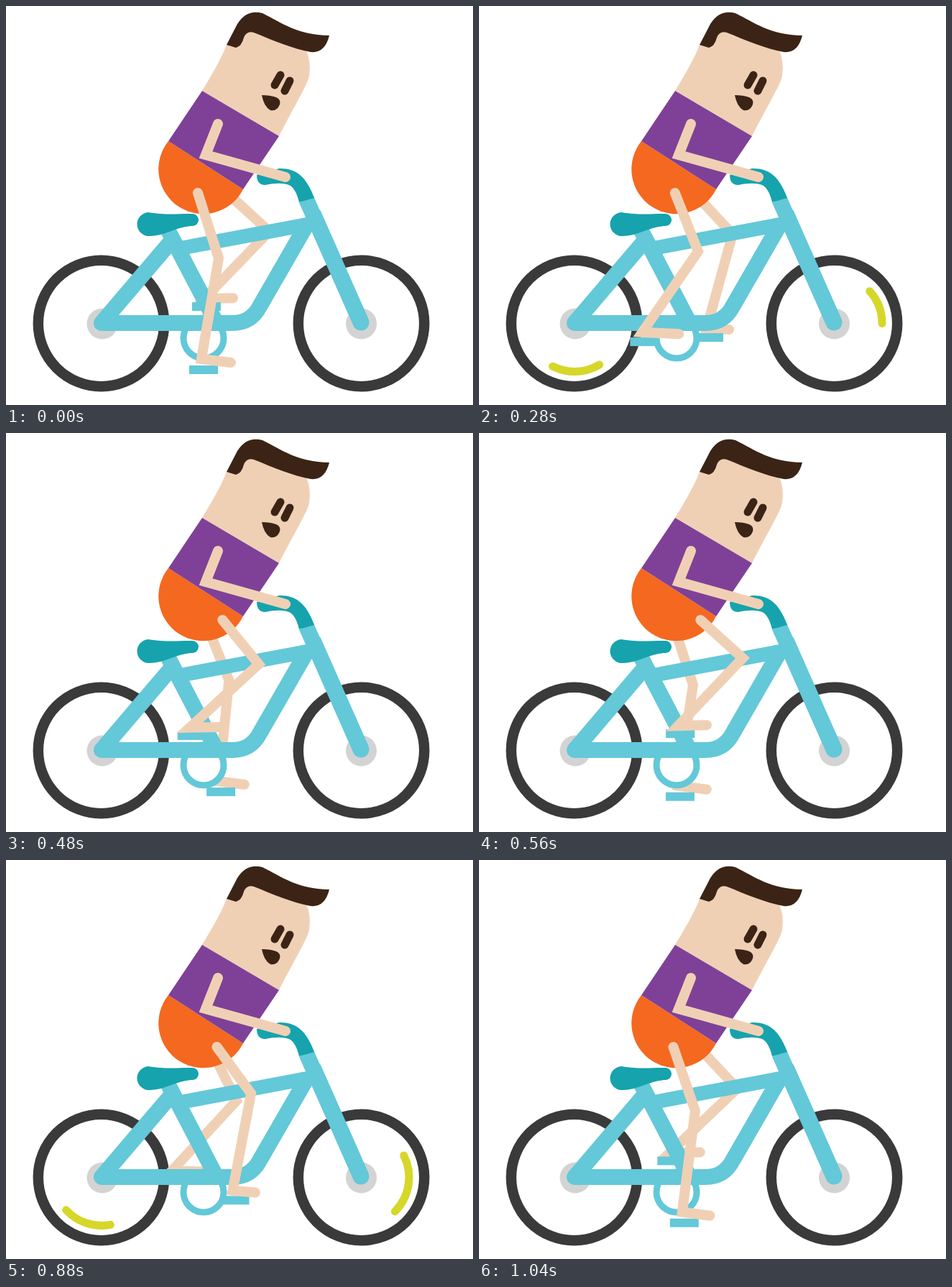
An HTML page that plays this animation: 650x555 px, repeating every 1.12 s.

```html
<!DOCTYPE html>
<html lang="en">
<head>
<meta charset="utf-8">
<title>Cyclist</title>
<style>
  html, body { margin: 0; width: 100%; height: 100%; overflow: hidden; background: #fff; }
  svg { display: block; width: 650px; height: 555px; }
  .line { fill: none; stroke-miterlimit: 10; }
  .tire { fill: none; stroke: #3a3a3a; stroke-width: 14.5; }
  .hub { fill: #d3d3d3; }
  .spark { stroke: #d6d729; stroke-width: 11; stroke-linecap: round; }
  .limb { stroke: #f0d0b5; stroke-width: 14; stroke-linecap: round; }
  .tube { stroke: #63c8d8; stroke-width: 22; stroke-linejoin: round; }
  .ring { fill: #fff; stroke: #63c8d8; stroke-width: 9; }
  .pedal { fill: #63c8d8; }
  .teal { fill: #16a3ad; }
  .skin { fill: #f0d0b5; }
  .dark { fill: #3b2416; }
  .eye { stroke: #3b2416; stroke-width: 11; stroke-linecap: round; }
</style>
</head>
<body>
<svg viewBox="0 0 650 555">
  <circle class="hub" cx="134" cy="442" r="21.5"/>
  <circle class="hub" cx="494.5" cy="442" r="21.5"/>
  <circle class="tire" cx="132.5" cy="441.5" r="87.7"/>
  <circle class="tire" cx="494.5" cy="441.5" r="87.7"/>
  <path id="rearSpark" class="line spark"/>
  <path id="frontSpark" class="line spark"/>

  <path id="farLeg" class="line limb"/>
  <rect id="farPedal" class="pedal" width="40" height="12"/>

  <!-- bicycle -->
  <circle class="ring" cx="275" cy="462" r="28"/>
  <g class="line tube">
    <path d="M231 326L133 441L315 441Q341 441 353 418L421 300"/>
    <path d="M224 309L292 439"/>
    <path d="M243 337L424 303" stroke-width="20"/>
    <path d="M418 269L494 440"/>
    <path d="M428 291L494 440" stroke-width="23" stroke-linecap="round"/>
  </g>
  <path class="teal" d="M198 287C225 291 235 289 259 289A8.500 8.500 0 0 1 260 306C240 306 220 320 200 320A16.500 16.500 0 0 1 198 287Z"/>
  <path class="teal" d="M349 235Q349 249 361 249C375 246 388 246 396 250Q404 256 408 273L429 267C420 243 408 225 380 226Z"/>

  <!-- rider -->
  <path fill="#f56820" d="M226 188A62.200 62.200 0 1 0 330 255Z"/>
  <path class="skin" d="M273 118C290 90 300 72 307 54L325 28L418 62Q425 77 422 97C420 108 411 122 380 181Z"/>
  <path fill="#7f4197" d="M273 118L380 181L330 255L226 188Z"/>
  <path class="dark" d="M307 54L322 25Q335 4 357 10C385 24 405 40 450 41Q444 66 424 64C400 60 370 47 345 37Q335 34 331 44Q328 56 320 58Z"/>
  <path class="line eye" d="M382 96L374 110M395 104L388 118"/>
  <path class="dark" d="M356 124Q368 124 376 127Q383 130 381 137Q377 147 368 145Q359 140 356 124Z"/>
  <path class="line limb" d="M295 164L278 207L389 238"/>

  <rect id="nearPedal" class="pedal" width="40" height="12"/>
  <path id="nearLeg" class="line limb"/>
</svg>
<script>
const LOOP = 1120, STEP = 40, FRAMES = 27;
const CYCLE = FRAMES * STEP; // the last pose rests for the remainder of the loop
const { sin, cos, min, PI } = Math;
const el = id => document.getElementById(id);
const rad = deg => deg * PI / 180;

// Every joint of a leg follows from the angle of its crank.
function drawLeg(name, deg) {
  const a = rad(deg), c = cos(a), s = sin(a);
  const hip = [287 + 12 * c - 20 * s, 260];
  const knee = [
    330 + 22 * c - 34 * s - 3 * sin(2 * a),
    331 - 11 * c + 18 * s - 2 * cos(2 * a) + 3 * sin(2 * a)
  ];
  const heel = [272 + 45 * c, 449 + 42 * s];
  const toe = [heel[0] + 41 - 10 * c, heel[1] + 2 + 3 * s];
  el(name + "Leg").setAttribute("d", "M" + [hip, knee, heel, toe].join(" "));
  el(name + "Pedal").setAttribute("x", 255 + 45 * c);
  el(name + "Pedal").setAttribute("y", 456 + 44 * s);
}

// An arc sweeps along the wheel, growing at first and closing up at the end.
function drawSpark(id, x, t, headStart, headSpeed, spanStart, spanSpeed) {
  const grow = min(1, (t - 200) / 80, (480 - t) / 80);
  const head = headStart + headSpeed * (t - 280);
  const tail = head - grow * (spanStart + spanSpeed * (t - 280));
  const point = deg => [x + 67 * cos(rad(deg)), 441.5 + 67 * sin(rad(deg))];
  el(id).setAttribute("d", grow > 0 ? `M${point(tail)}A67 67 0 0 1 ${point(head)}` : "");
}

function draw() {
  const now = performance.now() % LOOP;
  const t = STEP * min(FRAMES - 1, Math.floor(now / STEP));
  const turn = 2 * PI * t / CYCLE;
  const crank = 90 + 360 * t / CYCLE;
  drawLeg("near", crank - 5 + 5 * cos(2 * turn));
  drawLeg("far", crank + 176 + 9 * cos(turn));

  const pulse = t % (CYCLE / 2);
  drawSpark("rearSpark", 133, pulse, 117, 0.34, 58, 0);
  drawSpark("frontSpark", 494, pulse, 0, 0.75, 42, 0.5);
  requestAnimationFrame(draw);
}
draw();
</script>
</body>
</html>
```
